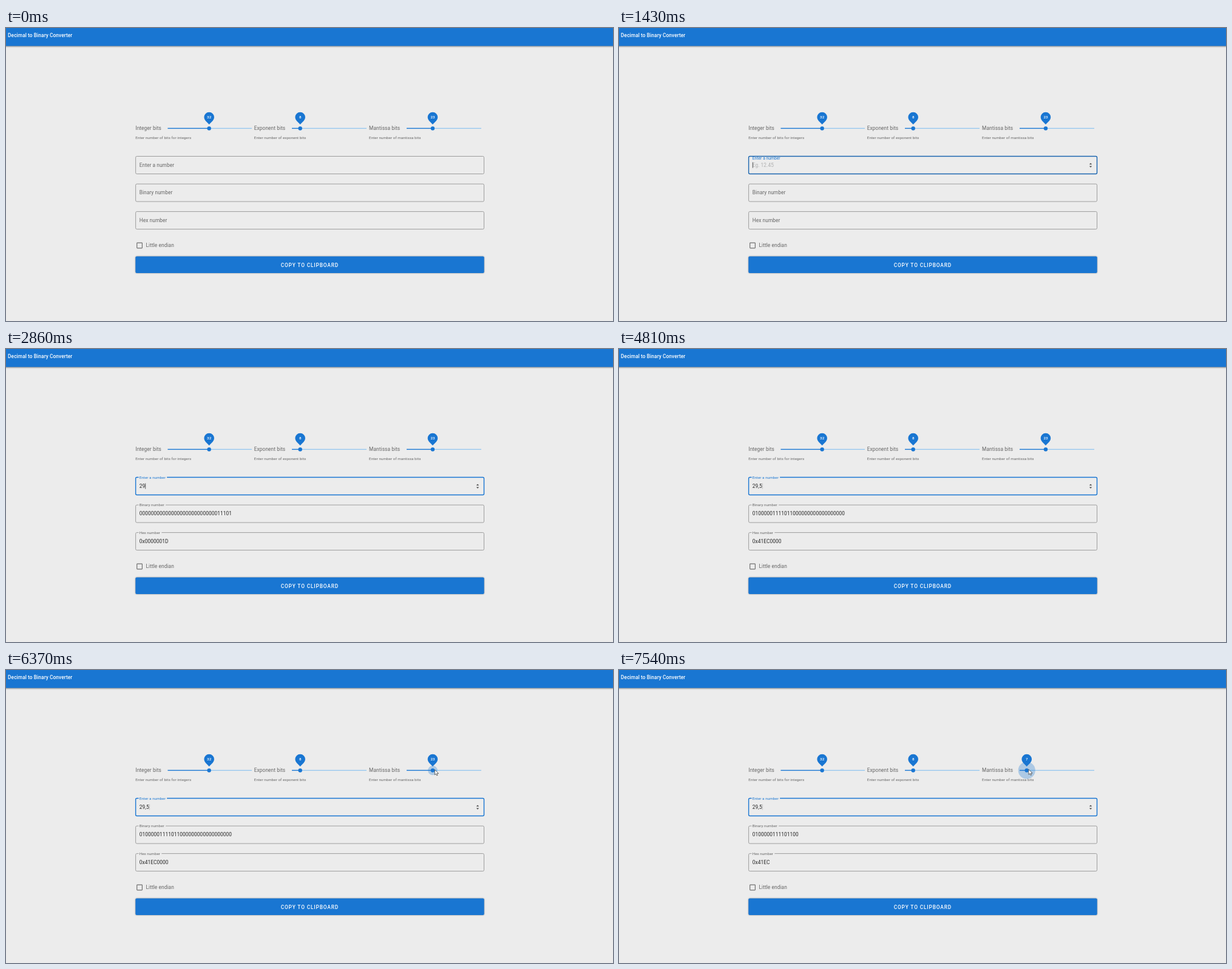
An HTML page that plays this animation: 1000 px wide and 483 px high, repeating every 8 s.

```html
<!DOCTYPE html>
<html lang="en">
<head>
<meta charset="utf-8">
<title>Decimal to Binary Converter</title>
<style>
  html, body { margin: 0; width: 100%; height: 100%; overflow: hidden; background: #ececec; }
  svg { display: block; width: 100vw; height: 100vh; }
  text { font-family: Roboto, Arial, sans-serif; font-size: 8.333px; letter-spacing: .00937em; fill: #666; white-space: pre; }
  .small { font-size: 6.25px; }
  .strong { font-weight: 500; fill: #fff; }
  .value { fill: #262626; }
  .pin { font-size: 6.25px; font-weight: 500; fill: #fff; text-anchor: middle; letter-spacing: 0; }
  .bar { filter: drop-shadow(0 1px 1.3px rgba(0,0,0,.45)); }
  .button { filter: drop-shadow(0 .8px .9px rgba(0,0,0,.4)); }
</style>
</head>
<body>
<svg id="stage" viewBox="0 0 1000 483" preserveAspectRatio="none"></svg>
<script>
const LOOP = 8000, STEP = 130;
const BLUE = '#1976d2', PAPER = '#ececec', GREY = '#666';
const stage = document.getElementById('stage');

function add(tag, attrs = {}, parent = stage, text = '') {
  const el = document.createElementNS('http://www.w3.org/2000/svg', tag);
  set(el, attrs);
  if (text) el.textContent = text;
  parent.appendChild(el);
  return el;
}
function set(el, attrs) {
  for (const key in attrs) el.setAttribute(key, attrs[key]);
}
const clamp = x => Math.max(0, Math.min(1, x));
const mix = (a, b, p) => a + (b - a) * p;
const smooth = p => p * p * (3 - 2 * p);
const span = (t, from, to) => clamp((t - from) / (to - from));

// cubic-bezier(.25, .8, .5, 1)
function swift(x) {
  if (x <= 0 || x >= 1) return clamp(x);
  let lo = 0, hi = 1, s = .5;
  for (let i = 0; i < 20; i++) {
    s = (lo + hi) / 2;
    const u = 1 - s;
    if (.75 * u * u * s + 1.5 * u * s * s + s ** 3 < x) lo = s; else hi = s;
  }
  const u = 1 - s;
  return 2.4 * u * u * s + 3 * u * s * s + s ** 3;
}
const settle = (t, start) => swift((t - start) / 300);

function makeSlider(label, hint, x, left, right, start) {
  add('text', { x, y: 168.1 }, stage, label);
  add('text', { x, y: 183.4, class: 'small' }, stage, hint);
  add('rect', { x: left, y: 164.8, width: right - left, height: 1.3, fill: '#93c6ef' });
  const fill = add('rect', { x: left, y: 164.8, height: 1.3, fill: BLUE });
  const thumb = add('g');
  const ring = add('circle', { r: 0, fill: BLUE, 'fill-opacity': .3 }, thumb);
  add('circle', { r: 3.2, fill: BLUE }, thumb);
  add('path', { d: 'M0-6.6L-5.89-12.5A8.33 8.33 0 1 1 5.89-12.5Z', fill: BLUE }, thumb);
  const number = add('text', { y: -16.2, class: 'pin' }, thumb);
  const update = (value, radius = 0) => {
    const at = left + (right - left) * (value - 1) / 63;
    set(fill, { width: at - left });
    set(thumb, { transform: `translate(${at} 165.5)` });
    set(ring, { r: radius });
    number.textContent = value;
  };
  update(start);
  return update;
}

function makeField(label, y) {
  const frame = add('rect', { x: 213.6, y, width: 573.9, height: 29, rx: 2, fill: 'none' });
  const notch = add('rect', { x: 218.6, y: y - 1.5, height: 3, fill: PAPER });
  const name = add('text', { x: 219.7 }, stage, label);
  const value = add('text', { x: 219.7, y: y + 17.3, class: 'value' });
  return {
    y, value,
    update(text, lift, stroke, width, color) {
      name.style.fontSize = mix(8.333, 6.25, lift) + 'px';
      name.style.fill = color;
      set(name, { y: y + mix(17.2, 2.3, lift) });
      set(notch, { width: lift > .9 ? name.getComputedTextLength() + 3.4 : 0 });
      set(frame, { stroke, 'stroke-width': width });
      value.textContent = text;
    }
  };
}

// Static page
add('rect', { width: 1000, height: 483, fill: PAPER });
add('rect', { x: -5, y: -5, width: 1010, height: 34.6, fill: BLUE, class: 'bar' });
add('text', { x: 3.1, y: 15.4, class: 'strong' }, stage, 'Decimal to Binary Converter');

makeSlider('Integer bits', 'Enter number of bits for integers', 213.3, 266.5, 405, 32);
makeSlider('Exponent bits', 'Enter number of exponent bits', 408.8, 471, 594, 8);
const mantissa = makeSlider('Mantissa bits', 'Enter number of mantissa bits', 598.1, 660, 783, 23);

const input = makeField('Enter a number', 211.5);
const binary = makeField('Binary number', 257.1);
const hex = makeField('Hex number', 302.6);
const hint = add('text', { x: 219.7, y: 228.8 }, stage, 'Eg. 12.45');
hint.style.fill = '#a0a0a0';
const spinner = add('path', { d: 'M774.8 224.9l2.2-2.5 2.2 2.5zM774.8 227.4l2.2 2.5 2.2-2.5z', fill: '#505050' });
const caret = add('rect', { y: 221.3, width: .7, height: 9.4, fill: '#222' });

add('rect', { x: 215.7, y: 354.1, width: 8.7, height: 8.7, rx: .8, fill: 'none', stroke: '#707070', 'stroke-width': 1.2 });
add('text', { x: 230.5, y: 361.1 }, stage, 'Little endian');
add('rect', { x: 213.3, y: 376.6, width: 574.4, height: 27.4, rx: 2, fill: BLUE, class: 'button' });
add('text', { x: 452.7, y: 393.5, class: 'strong', style: 'letter-spacing:.85px' }, stage, 'COPY TO CLIPBOARD');

const arrow = add('path', { d: 'M0 0V8.6L2 6.8 3.3 9.7 4.7 9.1 3.4 6.3H6.2Z', fill: '#fff', stroke: '#333', 'stroke-width': .7 });
const beam = add('path', { d: 'M-1.5-4.5H1.5M0-4.5V4.5M-1.5 4.5H1.5', stroke: '#333', 'stroke-width': .6 });

// Timeline
const CLICK = 1290, FOCUS = 1308, HOVER = 6243, PRESS = 6560;
const KEYS = [[2450, '2'], [2700, '29'], [3240, '29,'], [3630, '29,5']];

function typed(t) {
  let text = '', since = CLICK;
  for (const [time, next] of KEYS) if (t >= time) [since, text] = [time, next];
  return { text, since };
}

function encode(text, bits) {
  if (!text) return ['', ''];
  const code = text.endsWith('5')
    ? '0' + '10000011' + '11011'.padEnd(bits, '0')
    : parseInt(text).toString(2).padStart(32, '0');
  const digits = BigInt('0b' + code).toString(16).toUpperCase();
  return [code, '0x' + digits.padStart(Math.ceil(code.length / 4), '0')];
}

function pointer(t) {
  if (t >= 130 && t < CLICK) {
    const p = smooth(span(t, 0, 910));
    return [mix(420, 221, p), mix(490, 226, p)];
  }
  if (t >= 5330) {
    const p = smooth(span(t, 5200, 6240)), drag = smooth(span(t, PRESS, 7540));
    return [mix(mix(480, 706.4, p), 674.9, drag), mix(226, 164.3, p) - .5 * drag];
  }
  return null;
}

function caretAlpha(t, since) {
  if (t < CLICK) return 0;
  if (t >= 4690) return .3;
  return (t - since) % 1060 < 530 ? 1 : 0;
}

function draw(t) {
  const { text, since } = typed(t);
  const at = pointer(t);
  const inside = f => at && at[0] > 213 && at[0] < 788 && at[1] > f.y && at[1] < f.y + 29;
  const bits = Math.round(mix(23, 7, smooth(span(t, PRESS, 7540))));
  const [code, digits] = encode(text, bits);

  const focus = settle(t, FOCUS), lift = settle(t, KEYS[0][0]);
  const border = f => inside(f) ? '#303030' : '#959595';
  const active = `rgb(${[25, 118, 210].map(c => mix(34, c, focus)).join()})`;
  input.update(text, focus, t >= CLICK ? active : border(input), t >= CLICK ? 1.4 : .9, focus > 0 ? BLUE : GREY);
  binary.update(code, lift, border(binary), .9, GREY);
  hex.update(digits, lift, border(hex), .9, GREY);

  set(hint, { opacity: text ? 0 : focus });
  set(spinner, { opacity: t >= CLICK || inside(input) ? 1 : 0 });
  set(caret, {
    x: 219.9 + (text ? input.value.getComputedTextLength() : 0),
    opacity: caretAlpha(t, since)
  });

  const ring = t < HOVER ? 0 : 9.375 * (mix(.1, 1, settle(t, HOVER)) + .5 * settle(t, PRESS));
  mantissa(bits, ring);

  const overText = [input, binary, hex].some(inside);
  const place = at ? `translate(${at[0]} ${at[1]})` : '';
  set(arrow, { transform: place, opacity: at && !overText ? 1 : 0 });
  set(beam, { transform: place, opacity: at && overText ? 1 : 0 });
}

const begin = performance.now();
function tick() {
  const t = (performance.now() - begin) % LOOP;
  draw(Math.floor(t / STEP) * STEP);
  requestAnimationFrame(tick);
}
tick();
</script>
</body>
</html>
```
